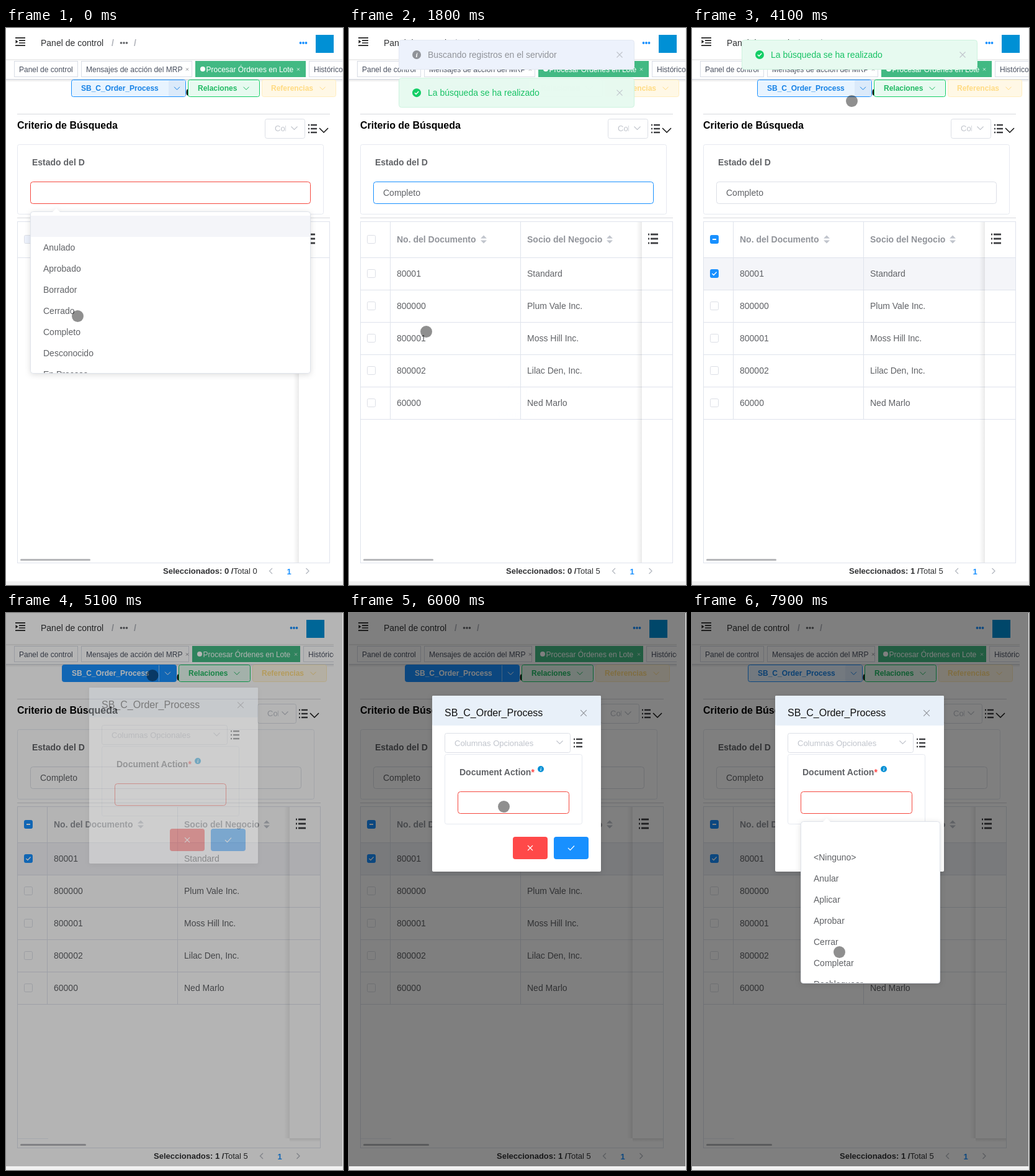
These frames come from a looping animation (543 px wide and 896 px high, 8 s). An HTML page:

```html
<!DOCTYPE html>
<html lang="es">
<head>
<meta charset="utf-8">
<title>Procesar Órdenes en Lote</title>
<style>
html, body { margin: 0; width: 100%; height: 100%; overflow: hidden; background: #fff; }
svg { display: block; }
text { font-family: "Liberation Sans", Arial, sans-serif; white-space: pre; }
.float { filter: drop-shadow(0 2px 5px rgba(0, 0, 0, .13)); }
</style>
</head>
<body>
<svg width="100%" height="100%" viewBox="0 0 543 896" preserveAspectRatio="xMinYMin">
  <defs>
    <linearGradient id="side"><stop offset="0" stop-opacity="0"/><stop offset="1" stop-opacity=".08"/></linearGradient>
    <linearGradient id="down" x2="0" y2="1"><stop offset="0" stop-opacity=".1"/><stop offset="1" stop-opacity="0"/></linearGradient>
  </defs>
  <g id="scene"></g>
</svg>
<script>
const LOOP = 8000, STEP = 100;
const BLUE = '#1890ff', RED = '#f5483f', GREEN = '#13ce66', EDGE = '#dcdfe6', LINE = '#dfe3ec';
const TEXT = '#606266', MUTED = '#909399', PALE = '#c0c4cc', LOGO = '#0090d5';

const STATES = ['', 'Anulado', 'Aprobado', 'Borrador', 'Cerrado', 'Completo', 'Desconocido', 'En Proceso'];
const ACTIONS = ['', '&lt;Ninguno&gt;', 'Anular', 'Aplicar', 'Aprobar', 'Cerrar', 'Completar', 'Desbloquear'];
const ORDERS = [['80001', 'Standard'], ['800000', 'Plum Vale Inc.'], ['800001', 'Moss Hill Inc.'],
  ['800002', 'Lilac Den, Inc.'], ['60000', 'Ned Marlo']];

// Pointer path: time, x, y
const PATH = [
  [0, 115.5, 463.5], [500, 115.5, 463.5], [800, 124.5, 488.5], [2000, 124.5, 488.5], [2400, 47, 401],
  [2500, 47, 401], [2900, 41.5, 397.5], [3400, 41.5, 397.5], [4000, 288, 102], [4100, 257.5, 117.5],
  [4200, 257.5, 117.5], [4500, 236, 100.5], [5200, 236, 100.5], [5900, 254, 307], [6000, 249.5, 311.5],
  [6700, 249.5, 311.5], [7100, 247, 446], [7200, 247, 446], [7400, 245, 491], [7700, 245, 491], [7900, 237.5, 545.5]
];

const clamp = v => Math.max(0, Math.min(1, v));
const bezier = (x1, y1, x2, y2) => x => {
  const at = (a, b, s) => 3 * a * s * (1 - s) ** 2 + 3 * b * s * s * (1 - s) + s ** 3;
  let lo = 0, hi = 1;
  for (let i = 0; i < 20; i++) {
    const mid = (lo + hi) / 2;
    if (at(x1, x2, mid) < x) lo = mid; else hi = mid;
  }
  return at(y1, y2, hi);
};
const ease = bezier(.25, .1, .25, 1), zoom = bezier(.23, 1, .32, 1), inOut = bezier(.42, 0, .58, 1);
const run = (t, start, length, curve = ease) => {
  const x = clamp((t - start) / length);
  return x === 0 || x === 1 ? x : curve(x);
};

const rect = (x, y, w, h, fill, r = 0, o = 1) =>
  `<rect x="${x}" y="${y}" width="${w}" height="${h}" rx="${r}" fill="${fill}" opacity="${o}"/>`;
const box = (x, y, w, h, fill, stroke, r = 3) =>
  `<rect x="${x + .5}" y="${y + .5}" width="${w - 1}" height="${h - 1}" rx="${r}" fill="${fill}" stroke="${stroke}"/>`;
const dot = (x, y, r, fill) => `<circle cx="${x}" cy="${y}" r="${r}" fill="${fill}"/>`;
const path = (d, stroke, w = 1) => `<path d="${d}" fill="none" stroke="${stroke}" stroke-width="${w}"/>`;
const text = (x, mid, size, fill, s, extra = '') =>
  `<text x="${x}" y="${mid + Math.round(size * .35)}" font-size="${size}" fill="${fill}" ${extra}>${s}</text>`;
const bold = (x, mid, size, fill, s, extra = '') => text(x, mid, size, fill, s, 'font-weight="bold" ' + extra);
const hline = (x1, x2, y, c = LINE) => rect(x1, y, x2 - x1, 1, c);
const vline = (x, y1, y2, c = LINE) => rect(x, y1, 1, y2 - y1, c);
const group = (s, o = 1, dx = 0, dy = 0, extra = '') =>
  `<g opacity="${o}" transform="translate(${dx} ${dy})" ${extra}>${s}</g>`;
const clip = (x, y, w, h, s) => `<svg x="${x}" y="${y}" width="${w}" height="${h}" viewBox="${x} ${y} ${w} ${h}">${s}</svg>`;
const chevron = (x, y, w, h, c, sw = 1) => path(`M${x - w / 2} ${y - h / 2}l${w / 2} ${h} ${w / 2} ${-h}`, c, sw);
const cross = (x, y, r, c, sw = 1) => path(`M${x - r} ${y - r}l${2 * r} ${2 * r}M${x + r} ${y - r}l${-2 * r} ${2 * r}`, c, sw);
const check = (x, y, r, c, sw = 1.3) => path(`M${x - r} ${y}l${r * .7} ${r * .7} ${r * 1.3} ${-r * 1.4}`, c, sw);
const dots = (x, y, gap, r, c) => [-gap, 0, gap].map(o => dot(x + o, y, r, c)).join('');
const list = (x, y, w, gap, h, c = '#3c3d40') => [-gap, 0, gap].map(o =>
  rect(x, y + o - h / 2, 2, h, c) + rect(x + 4, y + o - h / 2, w - 4, h, c)).join('');
const infoMark = (x, y, r, c) => dot(x, y, r, c) +
  `<text x="${x}" y="${y + r * .55}" font-size="${r * 1.6}" font-weight="bold" font-style="italic" text-anchor="middle" fill="#fff" style="font-family:'Liberation Serif',serif">i</text>`;

function navbar(d) {
  const k = d / 15, right = 542 - d - (d ? -1 : 0);
  const tag = (x, w, label, closeX) =>
    box(x, 53, w, 26, '#fff', '#d8dce5', 0) + text(x + 8, 67, 12, '#495060', label) +
    (closeX ? cross(closeX, 66.5, 2, MUTED) : '');
  const ax = 305 - 5 * k;
  return rect(0, 50, right, 3, 'url(#down)') +
    path('M15 15.8H31M21 20.2H31M21 24H31M15 28.2H31', '#222', 1.7) + '<path d="M15.5 19l4 3-4 3z" fill="#222"/>' +
    text(56, 24, 14, '#303133', 'Panel de control') +
    bold(170, 24, 14, '#b0b3ba', '/') + dots(190, 24, 4.5, 1.8, TEXT) + bold(206, 24, 14, '#b0b3ba', '/') +
    dots(479 - d, 24, 4.5, 1.9, BLUE) + rect(499 - d, 11, 29, 29, LOGO) +
    rect(0, 82, right, 1, '#d3d7e0') + rect(0, 83, right, 4, 'url(#down)') +
    clip(0, 50, right, 32,
      tag(13, 103, 'Panel de control') + tag(121, 179 - 5 * k, 'Mensajes de acción del MRP', 292) +
      rect(ax, 53, 178 - 4 * k, 26, '#42b983') + dot(ax + 12, 66, 4, '#fff') +
      text(ax + 17.5, 67, 12, '#fff', 'Procesar Órdenes en Lote') + cross(471 - 4 * k, 66.5, 2, '#d8f0e4') +
      tag(488 - 9 * k, 120, 'Histórico'));
}

function actions(filled) {
  const ink = filled ? '#fff' : '#1682e6';
  const main = box(105, 83, 185, 28, filled ? BLUE : '#e8f4ff', BLUE) +
    (filled ? vline(261, 84, 110, '#8ac6ff') : rect(262, 84, 27, 26, '#dbeafa', 2)) +
    bold(121, 97, 12, ink, 'SB_C_Order_Process') + chevron(275.5, 97, 9, 4.5, ink);
  return `<ellipse cx="293" cy="103.5" rx="2.5" ry="5" fill="#111"/>` + main +
    box(293, 83, 116, 28, '#e7faf0', GREEN) + bold(309, 97, 12, '#1fba62', 'Relaciones') + chevron(387, 97, 9, 4.5, '#1fba62') +
    box(412, 83, 120, 28, '#fff8e6', '#ffedbf') + bold(427, 97, 12, '#ffdb83', 'Referencias') + chevron(510, 97, 9, 4.5, '#ffdb83');
}

function criteria(t, d) {
  const edge = t < 1300 ? RED : t < 1400 ? '#b8625f' : t < 3200 ? BLUE : t < 3300 ? '#8fbdf0' : EDGE;
  const sx = d ? 405 : 417;
  return hline(18, 522 - d, 138, '#d8dade') + bold(18, 156, 16, '#000', 'Criterio de Búsqueda') +
    box(sx, 146, d ? 63 : 65, 32, '#fff', EDGE) +
    clip(sx + 16, 150, 18, 24, text(sx + 16, 161, 13, PALE, 'Columnas')) +
    chevron(464.5 - d, 161, 10, 5, PALE, 1.1) + list(487 - d, 162, 14, 6, 2.4) +
    chevron(512 - d, 164.5, 14, 7, '#111', 1.5) +
    box(18, 187, 494 - d, 113, '#fff', '#e6e9f0') + bold(42, 216, 14, TEXT, 'Estado del D') +
    box(39, 247, 452 - d, 36, '#fff', edge, 4) +
    (t >= 1300 ? text(55, 265, 14, TEXT, 'Completo') : '') +
    (t >= 100 && t < 600 ? vline(55, 257, 273, '#222') : '') +
    hline(18, 522 - d, 305, '#d8dade');
}

function checkbox(y, state) {
  const on = state === 'on' || state === 'some';
  return box(29, y - 7, 14, 14, on ? BLUE : state === 'off' ? '#edf2fc' : '#fff', on ? BLUE : EDGE, 2) +
    (state === 'on' ? check(36, y, 3.6, '#fff') : state === 'some' ? rect(33, y - 1, 6, 2, '#fff') : '');
}

function sorter(x) {
  return `<path d="M${x - 5} 338.5l5-5 5 5zM${x - 5} 341.5l5 5 5-5z" fill="${PALE}"/>`;
}

function table(t, d) {
  const loaded = t >= 1600, picked = t >= 3200, end = loaded ? 630 : 370;
  const right = 522 - d, fixed = 472 - d, floor = d ? 845 : 860;
  const mark = run(t, 3110, 250);
  const shade = w => picked ? rect(w, 370, right - 1 - w, 51, '#f4f5f9', 0, mark) : '';
  const rules = x => hline(x, right, 369) + (loaded ? ORDERS.map((_, i) => hline(x, right, 421 + 52 * i)).join('') : '');
  let s = shade(19) + rules(18) + vline(66, 312, end) + vline(276, 312, end) +
    checkbox(340, !loaded ? 'off' : picked ? 'some' : '') +
    bold(77, 340, 14, MUTED, 'No. del Documento') + sorter(217) +
    bold(287, 340, 14, MUTED, 'Socio del Negocio') + sorter(420);
  if (loaded) ORDERS.forEach(([no, partner], i) => {
    const y = 395 + 52 * i;
    s += checkbox(y, picked && !i ? 'on' : '') + text(77, y, 14, TEXT, no) + text(287, y, 14, TEXT, partner);
  });
  s += rect(fixed - 9, 312, 9, floor - 312, 'url(#side)') + rect(fixed, 312, right - fixed, floor - 312, '#fff') +
    shade(fixed) + rules(fixed) + list(482 - d, 339, 16, 7, 2.8);
  if (d) s += rect(fixed, floor, 50, 6, 'url(#down)') + hline(18, 68, 845, '#ebeef5');
  s += box(18, 311, right - 18, 550, 'none', LINE, 0) + rect(23, 854, d ? 106 : 113, 3, '#b6b7ba', 1.5);
  return s + loading(t);
}

function loading(t) {
  const shown = run(t, 1210, 300) * (1 - run(t, 1520, 300));
  if (!shown) return '';
  const age = t - 1210, grow = inOut(clamp(age / 750));
  const arc = `<circle r="16.8" fill="none" stroke="${BLUE}" stroke-width="1.7" stroke-linecap="round"
    stroke-dasharray="${.84 + 75 * grow} 168" stroke-dashoffset="${-33.6 * grow}" transform="translate(270 588) rotate(${age * .18})"/>`;
  return group(rect(18, 311, 504, 549, '#fff', 0, .9) + arc +
    text(270.5, 622, 14, BLUE, 'Cargando', 'text-anchor="middle"'), shown);
}

function footer(t, d) {
  const label = `<tspan font-weight="bold">Seleccionados: ${t >= 3200 ? 1 : 0} /</tspan>Total ${t >= 1600 ? 5 : 0}`;
  return group(text(253, 873, 13, '#303133', label) + path('M429 869l-4.5 4.5 4.5 4.5M483.5 869l4.5 4.5-4.5 4.5', '#b4b8c0', 1.3) +
    bold(456, 874, 13, BLUE, '1', 'text-anchor="middle"'), 1, -d);
}

function dropdown(x, y, w, tip, items, active, tint, shown) {
  if (!shown) return '';
  const rows = items.map((s, i) => (i === active ? rect(x + 1, y + 7 + 34 * i, w - 2, 34, tint) : '') +
    text(x + 21, y + 24 + 34 * i, 14, TEXT, s)).join('');
  const body = box(x, y, w, 261, '#fff', '#dfe3ea', 4) +
    `<path d="M${tip - 6} ${y + 1}l6-6 6 6z" fill="#fff"/>` + clip(x, y + 1, w, 259, rows);
  return `<g class="float" opacity="${shown}" transform="translate(0 ${y}) scale(1 ${shown}) translate(0 ${-y})">${body}</g>`;
}

function message(y, shown, good) {
  if (!shown) return '';
  const ink = good ? '#17c264' : MUTED;
  return group(box(80, 0, 380, 48, good ? '#e7faf0' : '#edf2fc', good ? '#cdf3de' : '#e3e8f2', 4) +
    (good ? dot(109, 24, 7, GREEN) + check(109, 24, 3.2, '#fff', 1.5) : infoMark(109, 24, 7, MUTED)) +
    text(127, 24, 14, ink, good ? 'La búsqueda se ha realizado' : 'Buscando registros en el servidor') +
    cross(436, 24, 4.5, PALE, 1.1), shown, 0, y);
}

function messages(t) {
  const sides = (a, b) => ({
    lift: 48 * (run(t, a, 400) - 1 - run(t, b, 400)),
    shown: run(t, a, 300) * (1 - run(t, b, 300))
  });
  const info = sides(1217, 3600), done = sides(1520, 4290);
  return message(19 + info.lift, info.shown, false) +
    message(83 - 64 * run(t, 3600, 400) + done.lift, done.shown, true);
}

function dialog(t) {
  const p = run(t, 5032, 300);
  if (!p) return '';
  const caret = (t >= 6300 && t < 6800) || (t >= 7300 && t < 7800);
  const s = rect(134, 133, 272, 283, '#fff', 2) + rect(134, 133, 272, 48, '#e8f0f9', 2) +
    text(154, 160, 16, '#111', 'SB_C_Order_Process') + cross(378, 161, 4.8, MUTED, 1.1) +
    box(154, 193, 203, 32, '#fff', EDGE) + text(170, 209, 13, PALE, 'Columnas Opcionales') +
    chevron(339.5, 208, 10, 5, PALE, 1.1) + list(362, 209, 14, 6, 2.4) +
    box(154, 227, 222, 113, '#fff', '#e6e9f0') + bold(178, 256, 14, TEXT, `Document Action<tspan fill="#ff4949">*</tspan>`) +
    infoMark(309, 251, 5, LOGO) + box(175, 287, 180, 36, '#fff', RED, 4) +
    (caret ? vline(191, 297, 313, '#222') : '') +
    rect(264, 360, 56, 36, '#ff4949', 4) + cross(292, 378, 4, '#fff', 1.1) +
    rect(330, 360, 56, 36, BLUE, 4) + check(358, 378, 5, '#fff', 1.2);
  return rect(0, 0, 542, 890, '#000', 0, .5 * run(t, 5032, 200)) + group(s, p, 0, -20 * (1 - p), 'class="float"');
}

function pointer(t) {
  const i = PATH.findIndex(k => k[0] > t);
  const b = i < 0 ? PATH[PATH.length - 1] : PATH[i], a = i < 1 ? b : PATH[i - 1];
  const p = a === b ? 0 : (t - a[0]) / (b[0] - a[0]);
  const x = a[1] + (b[1] - a[1]) * p, y = a[2] + (b[2] - a[2]) * p;
  return `<circle cx="${x}" cy="${y}" r="9.5" fill="#000" fill-opacity=".44"/>`;
}

function draw(t) {
  const d = t >= 5100 ? 15 : 0;
  const hover = t >= 1000 ? 5 : 0;
  return rect(0, 0, 543, 896, '#f1f1f1') + rect(0, 0, 542, 890, '#fff') +
    navbar(d) + group(actions(t >= 4600 && t < 6300), 1, -d) + criteria(t, d) + table(t, d) + footer(t, d) +
    dropdown(39, 295, 452, 81, STATES, hover, hover ? '#e8f4ff' : '#f4f5f9', 1 - run(t, 1210, 300, zoom)) +
    messages(t) + dialog(t) +
    dropdown(175, 335, 225, 217, ACTIONS, -1, '', run(t, 6280, 300, zoom)) + pointer(t);
}

const scene = document.getElementById('scene');
const begin = performance.now();
let last = -1;
function tick() {
  const t = Math.floor(((performance.now() - begin) % LOOP) / STEP) * STEP;
  if (t !== last) scene.innerHTML = draw(last = t);
  requestAnimationFrame(tick);
}
tick();
</script>
</body>
</html>
```
